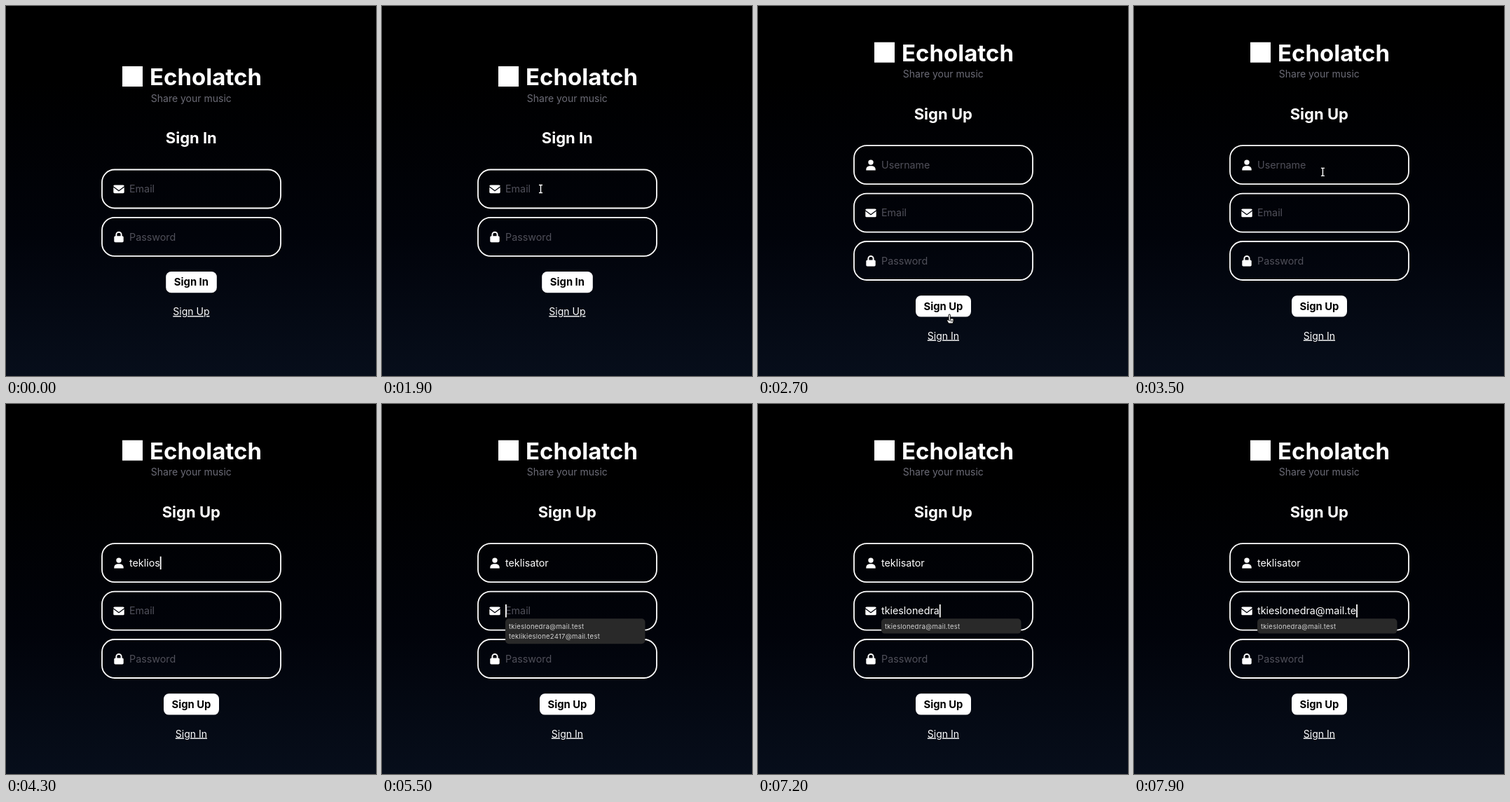
Write an HTML page that moves like this. It is 528x528 px and loops after 8 s.

```html
<!DOCTYPE html>
<html lang="en">
<head>
<meta charset="utf-8">
<title>Sign in</title>
<style>
  html, body { margin: 0; width: 100%; height: 100%; overflow: hidden; background: #000; }
  svg { display: block; width: 100vw; height: 100vh; }
  text { font-family: Inter, "Liberation Sans", sans-serif; font-size: 14.3px; fill: #fff; white-space: pre; }
  .mid { text-anchor: middle; }
  .title { font-size: 33px; font-weight: 700; }
  .tagline { font-size: 14px; fill: #6b6b76; }
  .heading { font-size: 22px; font-weight: 700; }
  .button { font-size: 14.8px; font-weight: 700; fill: #000; }
  .link { font-size: 14px; text-decoration: underline; text-decoration-thickness: 1px; text-underline-offset: 2px; }
  .hint { fill: #50505a; }
  .option { font-size: 9.5px; letter-spacing: .25px; fill: #d2d2d2; }
</style>
</head>
<body>
<svg id="stage" viewBox="0 0 528 528" xmlns="http://www.w3.org/2000/svg">
  <defs>
    <linearGradient id="night" x1="0" y1="0" x2="0" y2="1">
      <stop offset=".2" stop-color="#000"/>
      <stop offset=".62" stop-color="#01030a"/>
      <stop offset="1" stop-color="#070e1b"/>
    </linearGradient>
  </defs>
  <rect width="528" height="528" fill="url(#night)"/>
</svg>
<script>
const LOOP = 8000, STEP = 100;
const BRAND = "Echolatch";
const USER = "teklisator", TYPO = "teklios";
const MAIL = "tkieslonedra@mail.test";
const MAILS = [MAIL, "teklikieslone2417@mail.test"];
const SWITCH_AT = 2700, USER_FOCUS = 3700, TYPO_FIXED = 4800, MAIL_FOCUS = 5500;
const TEXT_X = 176, ROW_GAP = 68.4, SHIFT = 34.3;

// Each segment runs from start to end and arrives at the given values
const USER_TYPING = [
  { start: 3700, end: 4100, to: [4] },
  { start: 4200, end: 4300, to: [7] },
  { start: 4600, end: 4800, to: [5] },
  { start: 4800, end: 4900, to: [6] },
  { start: 5000, end: 5400, to: [10] }
];
const MAIL_TYPING = [
  { start: 6000, end: 6100, to: [1] },
  { start: 6200, end: 6500, to: [5] },
  { start: 6600, end: 7300, to: [13] },
  { start: 7400, end: 7900, to: [20] }
];
const POINTER_MOVES = [
  { start: 200, end: 800, to: [370, 88] },
  { start: 800, end: 1100, to: [226.5, 256] },
  { start: 1100, end: 1200, to: [226.5, 262] },
  { start: 1400, end: 1500, to: [226.5, 261] },
  { start: 1900, end: 2600, to: [273, 441] },
  { start: 2800, end: 3100, to: [277, 285] },
  { start: 3200, end: 3600, to: [268, 228] }
];

const linear = k => k;
const smooth = k => k * k * (3 - 2 * k);

function follow(segments, t, from, ease) {
  return segments.reduce((now, { start, end, to }) => {
    const k = ease(Math.min(1, Math.max(0, (t - start) / (end - start))));
    return now.map((value, i) => value + (to[i] - value) * k);
  }, from);
}
const typedCount = (segments, t) => Math.round(follow(segments, t, [0], linear)[0]);

const POINTERS = {
  arrow: `<path d="M0 0V13L3 10 5 14 7 13 5 9H9Z" stroke="#fff"/>`,
  hand: `<g fill="#fff" stroke="#000">
    <path d="M-1 5H6V9L5 12H-1L-4 7H-1Z" stroke-linejoin="round"/>
    <rect x="-1" y="-1" width="2.4" height="9" rx="1.2"/>
    <path d="M2.5 7V10M4.3 7V10" stroke-width=".7"/></g>`,
  beam: `<path d="M-2.5-5.5H2.5M0-5.5V5.5M-2.5 5.5H2.5" stroke="#fff" stroke-width="1.4"/>`
};

// Icons are centred on the origin
const ICONS = {
  user: `<circle cy="-3.9" r="3.7"/><path d="M-6.7 7.6V6A4.8 4.8 0 0 1-2 1.2H2A4.8 4.8 0 0 1 6.7 6V7.6Z"/>`,
  mail: `<rect x="-7.7" y="-5.9" width="15.4" height="11.8" rx="1.6"/>
    <path d="M-8-3.6 0 2.4 8-3.6" fill="none" stroke="#01030a" stroke-width="1.3"/>`,
  lock: `<path d="M-3.6 0V-3.5A3.6 3.4 0 0 1 3.6-3.5V0" fill="none" stroke="#fff" stroke-width="2"/>
    <rect x="-6.7" y="-1.4" width="13.4" height="9" rx="1.7"/>`
};

const stage = document.getElementById("stage");
const group = html => {
  const g = document.createElementNS("http://www.w3.org/2000/svg", "g");
  g.innerHTML = html;
  stage.append(g);
  return g;
};
const text = (kind, x, y, value) => `<text class="${kind}" x="${x}" y="${y}">${value}</text>`;

const field = ([icon, hint], y) => `
  <rect x="137" y="${y - 27.8}" width="255" height="55" rx="18" fill="none" stroke="#fff" stroke-width="1.8"/>
  <g transform="translate(161 ${y})" fill="#fff">${ICONS[icon]}</g>
  <g data-hint="${hint}">${text("hint", TEXT_X, y + 5, hint)}</g>`;

function page(action, other, shift, buttonWidth, fields) {
  const top = y => y - shift, bottom = y => y + shift;
  return group(`
    <rect x="166" y="${top(86)}" width="29" height="29" fill="#fff"/>
    ${text("title", 205, top(113), BRAND)}
    ${text("tagline mid", 264.3, top(136.5), "Share your music")}
    ${text("heading mid", 264.3, top(196.3), action)}
    ${fields.map((row, i) => field(row, top(261.3) + i * ROW_GAP)).join("")}
    <rect x="${264.5 - buttonWidth / 2}" y="${bottom(379)}" width="${buttonWidth}" height="30.3" rx="7.5" fill="#fff"/>
    ${text("button mid", 264.4, bottom(399.3), action)}
    ${text("link mid", 264.4, bottom(441.2), other)}`);
}

const mailField = ["mail", "Email"], lockField = ["lock", "Password"];
const signIn = page("Sign In", "Sign Up", 0, 72.6, [mailField, lockField]);
const signUp = page("Sign Up", "Sign In", SHIFT, 79, [["user", "Username"], mailField, lockField]);

const entry = (hint, y) => ({
  y,
  typed: group(text("", TEXT_X, y + 5, "")).firstChild,
  hint: signUp.querySelector(`[data-hint=${hint}]`)
});
const userEntry = entry("Username", 227), mailEntry = entry("Email", 227 + ROW_GAP);

const popup = group(`<rect x="176" y="306.3" width="199.5" rx="5" fill="#292929"/>` +
  MAILS.map((mail, i) => text("option", 181, 320.6 + i * 14.4, mail)).join(""));
const caret = group(`<rect width="1.8" height="18.5" fill="#fff"/>`).firstChild;
const pointer = group("");

const show = (node, on) => node.setAttribute("visibility", on ? "visible" : "hidden");

function fill({ typed, hint }, value, active) {
  typed.textContent = value;
  show(hint, active && !value);
}

function drawPointer(t, joined) {
  show(pointer, t >= 300 && t <= USER_FOCUS);
  const [x, y] = follow(POINTER_MOVES, t, [-40, 490], smooth);
  const firstRow = joined ? 227 : 261, rowCount = joined ? 3 : 2;
  const row = Math.round((y - firstRow) / ROW_GAP);
  const overField = x > 137 && x < 392 && row >= 0 && row < rowCount
    && Math.abs(y - firstRow - row * ROW_GAP) < 27;
  const overLink = Math.abs(x - 264) < 30 && Math.abs(y - 438) < 12;
  pointer.innerHTML = POINTERS[overField ? "beam" : overLink ? "hand" : "arrow"];
  pointer.setAttribute("transform", `translate(${x} ${y})`);
}

function draw(time) {
  const t = Math.floor(time % LOOP / STEP) * STEP;
  const joined = t >= SWITCH_AT, onMail = t >= MAIL_FOCUS;
  show(signIn, !joined);
  show(signUp, joined);

  const userText = (t < TYPO_FIXED ? TYPO : USER).slice(0, typedCount(USER_TYPING, t));
  const mailText = MAIL.slice(0, typedCount(MAIL_TYPING, t));
  fill(userEntry, userText, joined);
  fill(mailEntry, mailText, joined);

  const { typed, y } = onMail ? mailEntry : userEntry;
  const width = typed.textContent ? typed.getComputedTextLength() : 0;
  show(caret, t >= USER_FOCUS);
  caret.setAttribute("x", TEXT_X + width);
  caret.setAttribute("y", y - 9.4);

  show(popup, onMail);
  const [box, ...options] = popup.children;
  const matches = MAILS.map(mail => mail.startsWith(mailText));
  options.forEach((option, i) => show(option, onMail && matches[i]));
  box.setAttribute("height", matches[1] ? 36 : 21.3);

  drawPointer(t, joined);
}

const start = performance.now();
function tick() {
  draw(performance.now() - start);
  requestAnimationFrame(tick);
}
tick();
</script>
</body>
</html>
```
